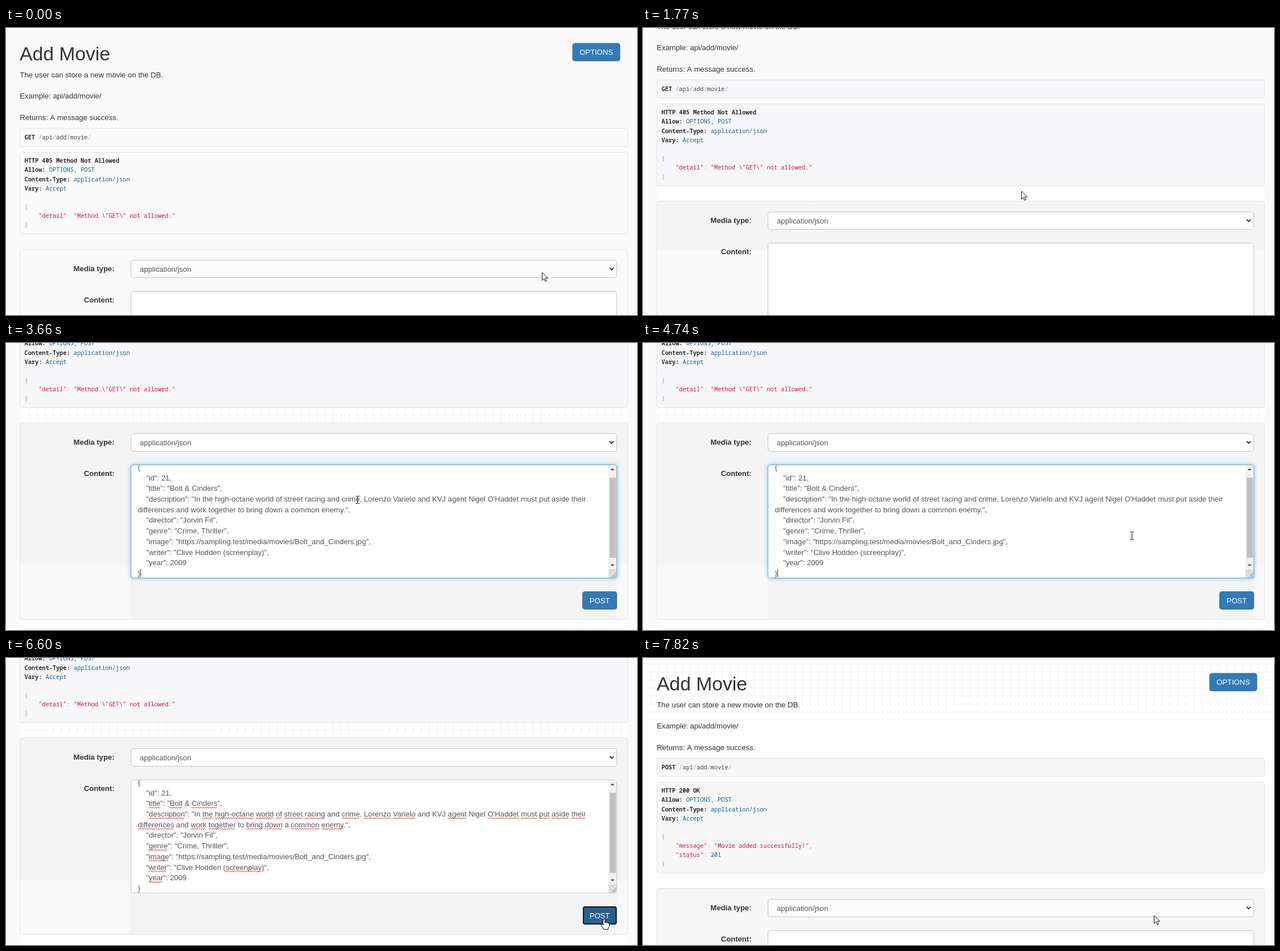
An HTML page with a canvas that plays this animation: 1108 by 505 pixels, repeating every 8000 ms.

```html
<!DOCTYPE html>
<html lang="en">
<head>
<meta charset="utf-8">
<title>Add Movie</title>
<style>
html, body { margin: 0; width: 100%; height: 100%; overflow: hidden; background: #fafafa; }
canvas { display: block; }
</style>
</head>
<body>
<canvas id="stage" width="1108" height="505"></canvas>
<script>
const c = document.getElementById('stage').getContext('2d');
const LOOP = 8000, RELOAD = 7550;
const SANS = '"Liberation Sans", Arial, sans-serif';
const BODY = `13.09px ${SANS}`;
const MONO = '10.28px "Noto Sans Mono", monospace';
const INK = { '*': '#2c2c30', '=': '#48484c', '-': '#93a1a1', '+': '#195f91', '~': '#d14' };

// pointer track: time, x, y
const TRACK = [
  [0, 941, 430], [160, 865, 360], [500, 865, 360], [760, 826, 337],
  [1100, 826, 337], [1700, 664, 287], [1920, 663, 288], [2530, 423, 306.5],
  [2700, 415, 347], [2760, 415, 347], [2960, 617, 275.5], [3860, 617, 275.5],
  [4460, 830, 324], [4600, 830, 324], [5440, 996, 411], [5460, 996, 411],
  [5650, 1028, 448], [5790, 1050, 459], [7140, 1050, 459], [7270, 893, 455], [7330, 897, 453]
];

// words after ^ get a spelling mark
const CONTENT = [
  '{',
  '    "id": 21,',
  '    "^title": "^Bolt & ^Cinders",',
  '    "^description": "In ^the ^high-octane ^world ^of ^street ^racing and ^crime, ^Lorenzo ^Varielo and KVJ ^agent Nigel ^O\'Haddet ^must ^put ^aside ^their',
  '^differences and ^work ^together to ^bring ^down a ^common ^enemy.",',
  '    "director": "Jorvin Fil",',
  '    "^genre": "Crime, Thriller",',
  '    "^image": "https://sampling.test/media/movies/Bolt_and_Cinders.jpg",',
  '    "^writer": "Clive Hodden (^screenplay)",',
  '    "^year": 2009',
  '}'
];

const ARROW = new Path2D('M0 0V14L3.3 11L5.6 16.2L7.8 15.2L5.6 10.2H10Z');
const BEAM = new Path2D('M-3.5-6.5H-1L0-6L1-6.5H3.5M0-6V6M-3.5 6.5H-1L0 6L1 6.5H3.5');
const HAND = new Path2D('M-2 1.5Q-.5-.8 1 1.5V6.5Q3 5 4 7Q6 5.8 6.8 7.7Q9 7 9 9.5V13L7 16V18.5H-1.5V16.5L-5.8 10.5Q-5.5 8.3-4 9.2L-2 11Z');

const ramp = (t, a, b) => Math.min(1, Math.max(0, (t - a) / (b - a)));

function rect(x, y, w, h, color) {
  c.fillStyle = color;
  c.fillRect(x, y, w, h);
}

function box(x, y, w, h, fill, line) {
  c.beginPath();
  c.roundRect(x + .5, y + .5, w, h, 4);
  if (fill) { c.fillStyle = fill; c.fill(); }
  if (line) { c.strokeStyle = line; c.lineWidth = 1; c.stroke(); }
}

function text(s, x, y, color = '#333', font = BODY, align = 'left') {
  c.font = font;
  c.fillStyle = color;
  c.textAlign = align;
  c.fillText(s, x, y);
}

function line(color, width, ...pts) {
  c.beginPath();
  pts.forEach(([x, y]) => c.lineTo(x, y));
  c.strokeStyle = color;
  c.lineWidth = width;
  c.stroke();
}

// each part starts with its ink key
function code(y, ...parts) {
  let x = 32.5;
  for (const p of parts) {
    const s = p.slice(1);
    text(s, x, y, INK[p[0]], (p[0] === '*' ? 'bold ' : '') + MONO);
    x += s.length * 6.168;
  }
}

function grid(x, y, w, h, scroll) {
  c.save();
  c.beginPath();
  c.rect(x, y, w, h);
  c.clip();
  rect(x, y, w, h, '#fff');
  for (let i = 0; i < 80; i++) {
    rect(Math.round(12.8 + i * 14.04), y, 1, h, '#f3f3f3');
    rect(x, Math.round(10 - scroll + i * 14.04), w, 1, '#f3f3f3');
  }
  c.restore();
}

function head(done, fill) {
  text('Add Movie', 24, 57, '#333', `33.66px ${SANS}`);
  text('The user can store a new movie on the DB.', 24.3, 87);
  text('Example: api/add/movie/', 24.3, 124);
  text('Returns: A message success.', 24.3, 161.5);
  box(994.5, 26.5, 83, 31, '#337ab7', '#2e6da4');
  text('OPTIONS', 1036.5, 47, '#fff', BODY, 'center');

  box(24, 176, 1067, 32, fill, '#e1e1e4');
  code(195.5, done ? '*POST ' : '*GET ', '-/', '=api', '-/', '=add', '-/', '=movie', '-/');
  box(24, 218, 1067, done ? 160 : 144, fill, '#e1e1e4');
  const row = (i, ...parts) => code(237.3 + i * 16.12, ...parts);
  row(0, done ? '*HTTP 200 OK' : '*HTTP 405 Method Not Allowed');
  row(1, '*Allow: ', '+OPTIONS, POST');
  row(2, '*Content-Type: ', '+application/json');
  row(3, '*Vary: ', '+Accept');
  row(5, '-{');
  if (done) {
    row(6, '~    "message"', '-: ', '~"Movie added successfully!"', '-,');
    row(7, '~    "status"', '-: ', '+201');
  } else {
    row(6, '~    "detail"', '-: ', '~"Method \\"GET\\" not allowed."');
  }
  row(done ? 8 : 7, '-}');
}

function squiggle(x, end, y) {
  const pts = [];
  for (let i = 0; x <= end; x += 2, i++) pts.push([x, y + (i % 2 ? 1.2 : -1.2)]);
  line('#e8302c', 1, ...pts);
}

function content(marked) {
  CONTENT.forEach((raw, i) => {
    const y = 471.9 + i * 18.7;
    text(raw.replaceAll('^', ''), 231.5, y, '#555');
    if (!marked) return;
    for (const m of raw.matchAll(/\^([\w'-]+)/g)) {
      const x = 231.5 + c.measureText(raw.slice(0, m.index).replaceAll('^', '')).width;
      squiggle(x, x + c.measureText(m[1]).width, y + 3);
    }
  });
}

function triangle(x, y, dy, w, color) {
  c.beginPath();
  c.moveTo(x - w, y);
  c.lineTo(x + w, y);
  c.lineTo(x, y + dy);
  c.fillStyle = color;
  c.fill();
}

function textarea(t) {
  const focus = ramp(t, 3200, 3330) * (1 - ramp(t, 6250, 6450));
  if (focus) {
    c.save();
    c.globalAlpha = focus;
    c.shadowColor = 'rgba(102,175,233,.8)';
    c.shadowBlur = 6;
    box(219, 463, 853, 199, '#fff', '#66afe9');
    c.restore();
  }
  box(219, 463, 853, 199, '#fff', '#c4c4c4');
  const filled = t >= 3660 && t < RELOAD;
  if (filled) {
    c.save();
    c.beginPath();
    c.rect(220, 464, 852, 198);
    c.clip();
    content(t >= 5510);
    rect(1058, 464, 14, 198, '#f1f1f1');
    rect(1060, 486, 11, 141, '#c1c1c1');
    triangle(1065, 473, -3.5, 3.5, '#505050');
    triangle(1065, 638.5, 3.5, 3.5, '#505050');
    rect(1058, 647, 14, 15, '#dcdcdc');
    c.restore();
  }
  line('#777', 1, [1064, 661], [1071, 654]);
  line('#777', 1, [1068, 661], [1071, 658]);
  if (focus) {
    c.save();
    c.globalAlpha = focus;
    box(219, 463, 853, 199, null, '#66afe9');
    c.restore();
  }
  if (t >= 3330 && t < 3660) rect(231, 470, 1, 15, '#333');
  if (filled && t < 6250 && Math.floor((t - 3660) / 530) % 2 === 0) rect(236, 647, 1, 14, '#333');
}

function postButton(t) {
  const used = t >= 6250 && t < RELOAD;
  const hot = t >= 5720 && t < RELOAD;
  box(1012, 686, 60, 31, hot ? '#286090' : '#337ab7', hot ? '#204d74' : '#2e6da4');
  if (used) {
    box(1012, 685, 60, 32, null, '#dbe6ef');
    c.beginPath();
    c.roundRect(1014, 687, 57.5, 30, 3);
    c.strokeStyle = '#101a24';
    c.lineWidth = 2;
    c.stroke();
  }
  text('POST', 1042.5, 706.5, '#fff', BODY, 'center');
}

function form(t, scroll, fill) {
  box(24, 389, 1067, 346, fill, null);
  if (scroll) {
    const top = 390 + scroll;
    if (scroll < 200) rect(25, top, 1066, 735 - top, '#f9f9f9');
    else {
      rect(25, top, 194, 735 - top, '#f9f9f9');
      rect(1073, top, 18, 735 - top, '#f8f8f8');
    }
  }
  box(24, 389, 1067, 346, null, '#e3e3e3');
  text('Media type:', 190.5, 427.5, '#333', 'bold ' + BODY, 'right');
  box(219, 408, 853, 31, scroll ? '#fff' : '#fcfcfc', '#c4c4c4');
  text('application/json', 235, 428.5, '#555');
  line('#333', 1.8, [1060, 422], [1063.5, 425.5], [1067, 422]);
  text('Content:', 190.5, 483, '#333', 'bold ' + BODY, 'right');
  textarea(t);
  postButton(t);
}

function tooltip(t) {
  c.save();
  c.globalAlpha = .9 * ramp(t, 6740, 6950);
  box(948.5, 391.5, 184, 38, '#000');
  triangle(1042.5, 430, 4.7, 4.7, '#000');
  c.globalAlpha = ramp(t, 6740, 6950);
  const font = `11.2px ${SANS}`;
  text('Make a POST request on the', 1040, 406.5, '#fff', font, 'center');
  text('Add Movie resource', 1040, 422.5, '#fff', font, 'center');
  c.restore();
}

function pointer(t) {
  let i = TRACK.length - 1;
  while (TRACK[i][0] > t) i--;
  const a = TRACK[i], b = TRACK[i + 1] || a;
  const k = a === b ? 0 : (t - a[0]) / (b[0] - a[0]);
  const x = a[1] + (b[1] - a[1]) * k, y = a[2] + (b[2] - a[2]) * k;
  const inside = (l, tp, r, bt) => t >= 1900 && t < RELOAD && x > l && x < r && y > tp && y < bt;
  const beam = inside(220, 214, 1073, 413);
  const shape = beam ? BEAM : inside(1012, 437, 1073, 469) ? HAND : ARROW;
  c.save();
  c.translate(Math.round(x) + .5, Math.round(y));
  c.fillStyle = '#fff';
  c.strokeStyle = '#111';
  c.lineWidth = 1;
  if (!beam) c.fill(shape);
  c.stroke(shape);
  c.restore();
}

function scrollAt(t) {
  if (t < 1770 || t >= RELOAD) return 0;
  return t < 1840 ? 85 : t < 1900 ? 170 : t < 2890 ? 250 : 249;
}

function draw(t) {
  const scroll = scrollAt(t), done = t >= RELOAD;
  rect(0, 0, 1108, 505, '#fafafa');
  if (done) {
    grid(0, 0, 1108, 505, 0);
    const fade = c.createLinearGradient(0, 60, 0, 185);
    fade.addColorStop(0, 'rgba(253,253,253,0)');
    fade.addColorStop(1, '#fdfdfd');
    rect(0, 60, 1108, 445, fade);
  } else if (scroll >= 200) {
    grid(24, 363 - scroll, 1068, 26, scroll);
    rect(24, 736 - scroll, 1068, 30, '#fefefe');
  } else if (scroll) {
    rect(24, 363 - scroll, 1068, 26, '#fefefe');
  }

  if (!done || t >= 7730) {
    c.save();
    // the page settles into place after the reload
    if (done && t < 7820) c.translate(-27, 45);
    c.translate(0, -scroll);
    head(done, done ? '#f7f7f7' : scroll ? '#f7f7f9' : '#fafafa');
    if (done) c.translate(0, 16);
    form(t, scroll, done ? '#f7f7f7' : scroll ? '#f4f4f4' : '#fafafa');
    c.restore();
  }
  if (t > 6740 && !done) tooltip(t);
  pointer(t);
}

const start = performance.now();
function tick() {
  draw((performance.now() - start) % LOOP);
  requestAnimationFrame(tick);
}
tick();
</script>
</body>
</html>
```
